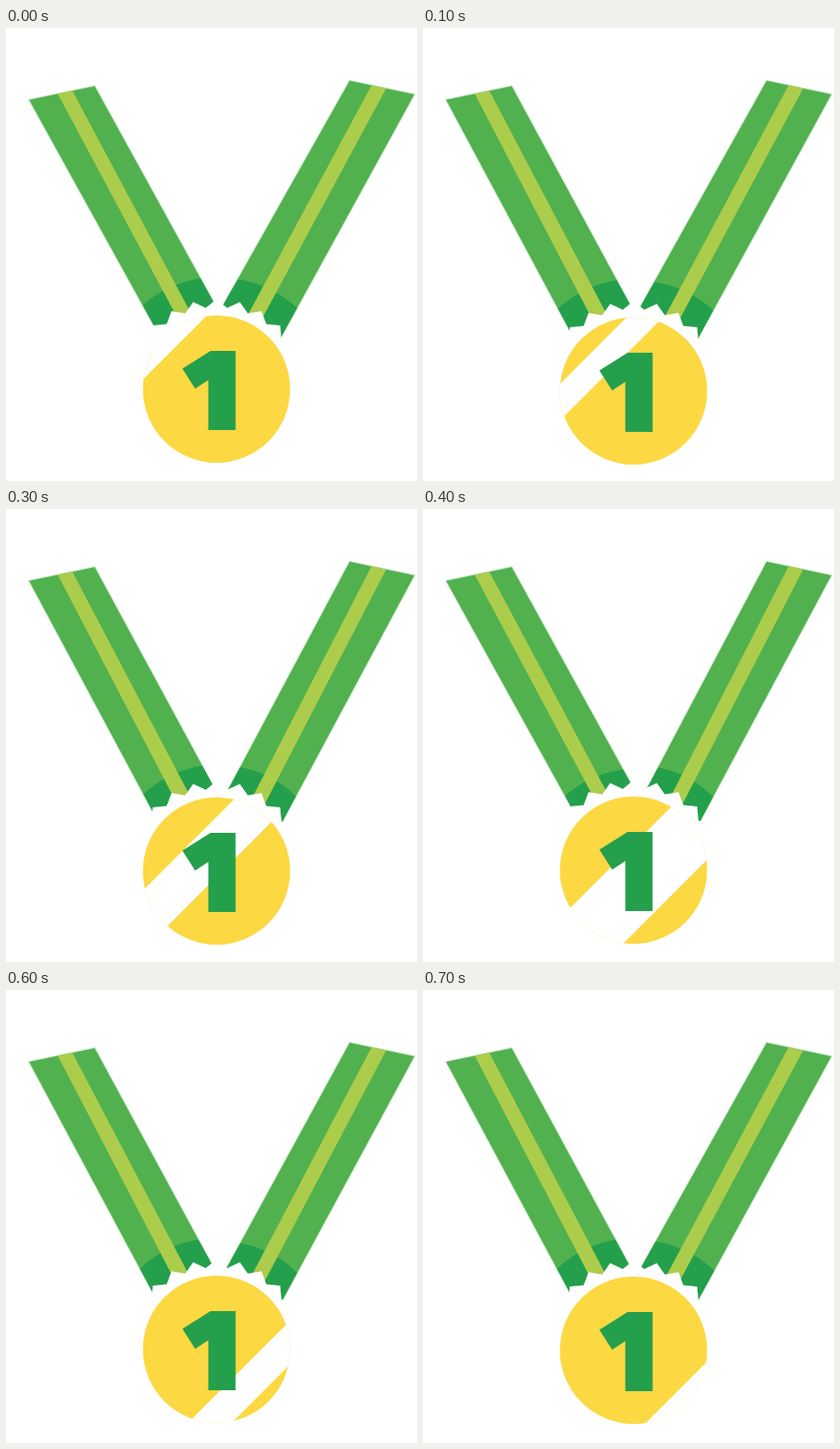
Write an HTML page with a canvas that moves like this. It is 452x498 px and loops after 800 ms.

```html
<!DOCTYPE html>
<html lang="en">
<head>
<meta charset="utf-8">
<title>Medal</title>
<style>
html, body { margin: 0; width: 100%; height: 100%; overflow: hidden; background: #fff; }
canvas { display: block; }
</style>
</head>
<body>
<canvas id="stage" width="452" height="498"></canvas>
<script>
const ctx = document.getElementById('stage').getContext('2d');
const GREEN = '#51b14e', DARK = '#249f4c', LIME = '#accd4b', GOLD = '#fcd842';
const STEP = 100, STEPS = 8, CX = 231.5, CY = 397, RADIUS = 81;

// Key points [step, x + y] of the two diagonal edges of the shine
const shineTop = [[0, 510], [1, 542], [3, 570], [5, 631], [7, 721]];
const shineEnd = [[0, 537], [1, 582], [3, 636], [4, 698], [5, 703], [7, 745]];

function between(keys, i) {
  const n = Math.max(1, keys.findIndex(([k]) => k >= i));
  const [k0, v0] = keys[n - 1], [k1, v1] = keys[n];
  return v0 + (v1 - v0) * (i - k0) / (k1 - k0);
}

function trace(points) {
  ctx.beginPath();
  points.forEach(([x, y]) => ctx.lineTo(x, y));
  ctx.closePath();
}

function fill(points, color) {
  trace(points);
  ctx.fillStyle = color;
  ctx.fill();
}

function disc(x, y, r, color) {
  ctx.beginPath();
  ctx.arc(x, y, r, 0, 2 * Math.PI);
  ctx.fillStyle = color;
  ctx.fill();
}

function clipped(paint) {
  ctx.save();
  ctx.clip();
  paint();
  ctx.restore();
}

// Each edge is [x, y, slope]: a line running down behind the medal
function strip([x1, y1, k1], [x2, y2, k2]) {
  const end = 400;
  return [[x1, y1], [x2, y2], [x2 + k2 * (end - y2), end], [x1 + k1 * (end - y1), end]];
}

function ribbon(left, stripeLeft, stripeRight, right, x, y, r) {
  const body = strip(left, right);
  fill(body, GREEN);
  ctx.strokeStyle = GREEN + '50'; // soft rim
  ctx.lineWidth = 2;
  ctx.stroke();
  clipped(() => disc(x, y, r, DARK));
  fill(strip(stripeLeft, stripeRight), LIME);
}

function medal(i, cy) {
  const star = Array.from({ length: 48 }, (_, n) => {
    const a = n * Math.PI / 24, r = n % 2 ? 90 : 99;
    return [CX + r * Math.sin(a), cy - r * Math.cos(a)];
  });
  fill(star, '#fff');
  disc(CX, cy, RADIUS, GOLD);

  const a = between(shineTop, i), b = between(shineEnd, i);
  clipped(() => fill([[a - 520, 520], [a - 280, 280], [b - 280, 280], [b - 520, 520]], '#fff'));

  const one = [[194, 374.5], [225, 355], [252.5, 355], [252.5, 442],
    [222.5, 442], [222.5, 387], [208, 396.5]];
  fill(one.map(([x, y]) => [x, y + cy - CY]), DARK);
}

function draw(i) {
  const turn = i * 2 * Math.PI / STEPS;
  const cy = CY + Math.round(.2 + 1.8 * Math.sin(turn + .16));
  const s = Math.max(0, Math.cos(2 * turn));
  const t = .5 + .5 * Math.cos(turn);

  ctx.fillStyle = '#fff';
  ctx.fillRect(0, 0, 452, 498);
  ribbon([25.5, 79, .536 + .017 * s], [57, 72.5, .521 + .013 * s],
    [73, 69, .525 + .008 * s], [97.5, 64, .542 + .009 * s],
    CX, cy, 123 - 12 * (1 - t) ** 4);
  ribbon([378, 58, -.528 - .036 * t], [402, 63, -.512 - .027 * t],
    [418, 66.5, -.514 - .025 * t], [449, 73, -.534 - .015 * t],
    237, cy, 115 + 7 * t);
  medal(i, cy);
}

const start = performance.now();
function loop() {
  draw(Math.floor((performance.now() - start) / STEP) % STEPS);
  requestAnimationFrame(loop);
}
loop();
</script>
</body>
</html>
```
